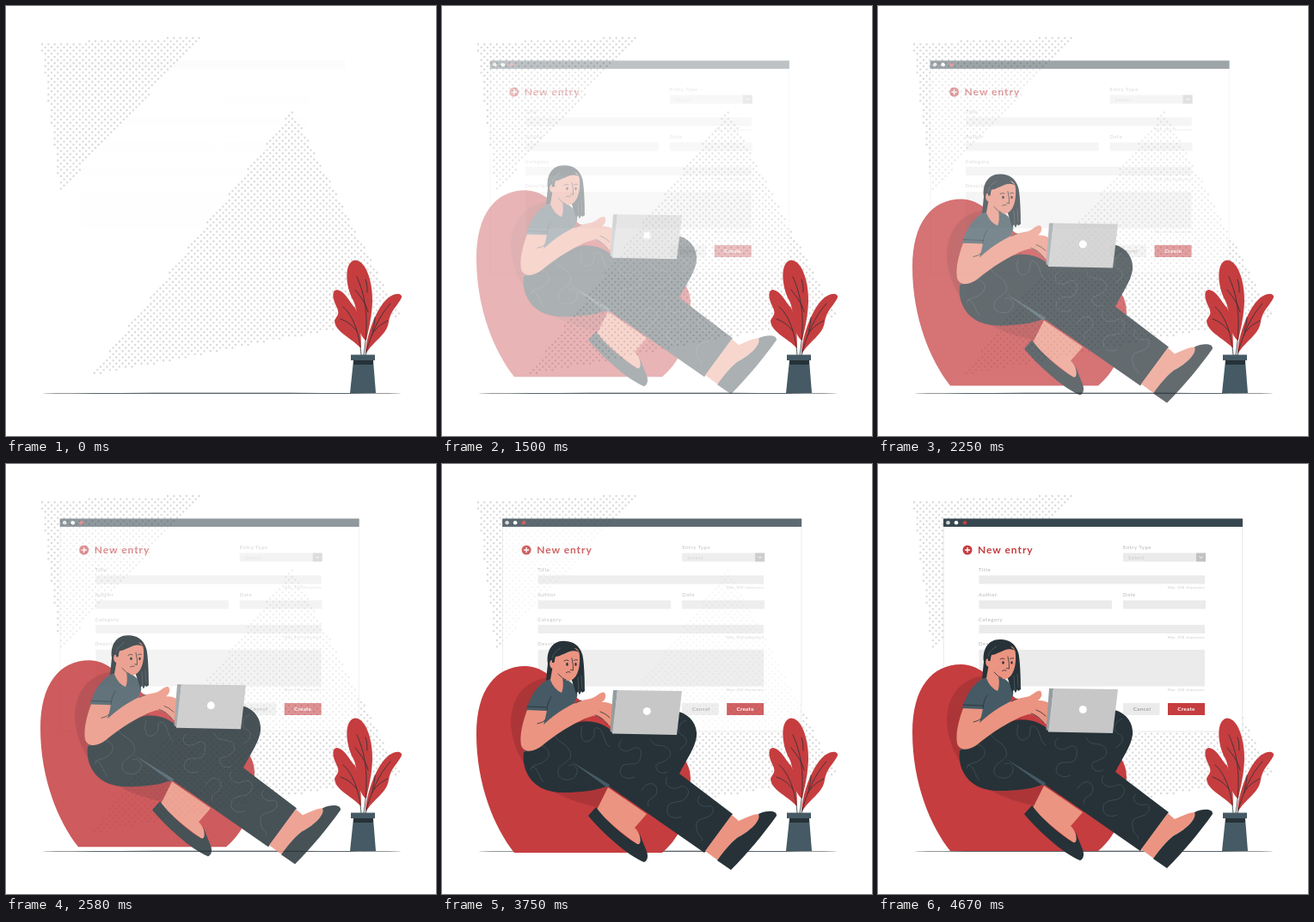
These frames come from a looping animation (500x500 px, 4.71 s). An HTML page:

```html
<!DOCTYPE html>
<html lang="en">
<head>
<meta charset="utf-8">
<title>New entry</title>
<style>
  html, body { margin: 0; height: 100%; overflow: hidden; background: #fff; }
  svg { display: block; width: 100vw; height: 100vh; }
  text { font-family: Lato, sans-serif; fill: #b3b3b3; font-size: 6px; letter-spacing: .5px; }
  .hint { font-size: 4.2px; letter-spacing: .3px; fill: #c4c4c4; text-anchor: end; }
  .button { font-size: 6.4px; font-weight: 700; letter-spacing: .25px; text-anchor: middle; }
  .red { fill: #c53d3f; }
  .dark { fill: #263238; }
  .slate { fill: #455a64; }
  .skin { fill: #eb9481; }
  .field { fill: #ebebeb; }
  .line { fill: none; stroke: #263238; stroke-width: .8; stroke-linecap: round; }
  #dots { fill: none; stroke: #d9d9d9; stroke-width: 2.4; stroke-linecap: round; }
</style>
</head>
<body>
<svg viewBox="0 0 500 500">
  <path id="dots"/>
  <ellipse class="dark" cx="251" cy="450.3" rx="209" ry=".5"/>

  <g id="form">
    <path d="M76.3 64H423.7V311H76.3Z" fill="#fff" stroke="#e0e0e0" stroke-width=".7"/>
    <path d="M76 63.5H424V73H76Z" fill="#37474f"/>
    <circle cx="81.5" cy="68.2" r="2.3" fill="#d5d5d5"/>
    <circle cx="91" cy="68.2" r="2.3" fill="#fff"/>
    <circle cx="101" cy="68.2" r="2.3" class="red"/>
    <circle cx="104" cy="100" r="5.5" class="red"/>
    <path d="M101 100h6M104 97v6" stroke="#fff" stroke-width="1.3"/>
    <text x="116" y="104.3" style="font-size:12px;font-weight:700;letter-spacing:.95px;fill:#c53d3f">New entry</text>
    <path class="field" d="M285 103.5h96v10h-96zM117.5 129.5H380v10H117.5zM117.5 158.5H272v10H117.5zM285 158.5h96v10h-96zM117.5 187H380v10H117.5zM117.5 216H380v42.5H117.5zM285 278h42.5v14H285z"/>
    <path d="M370 103.5h11v10h-11z" fill="#c2c2c2"/>
    <path d="M373.8 107.5l1.7 2 1.7-2" fill="none" stroke="#fff" stroke-width=".9"/>
    <path class="red" d="M337 278h43v14h-43z"/>
    <text x="285" y="99">Entry Type</text>
    <text x="291" y="110.7" style="fill:#c9c9c9">Select</text>
    <text x="117" y="125">Title</text>
    <text x="117" y="154">Author</text>
    <text x="285" y="154">Date</text>
    <text x="117" y="183">Category</text>
    <text x="117" y="211">Description</text>
    <text class="hint" x="380" y="145.3">Max. 250 characters</text>
    <text class="hint" x="380" y="203">Max. 250 characters</text>
    <text class="hint" x="380" y="264.3">Max. 250 characters</text>
    <text class="button" x="307" y="287.3" style="fill:#a3a3a3">Cancel</text>
    <text class="button" x="358.5" y="287.3" style="fill:#fff">Create</text>
  </g>

  <g id="plant">
    <path class="red" d="M417 388C405 374 411 357 404 343C394 325 393 297 406 295.5C420 296 427 325 426 345C425 365 421 378 419 389Z"/>
    <path class="red" d="M413 398C400 385 383 379 382 366C385 359 389 359 384 349C379 339 379 330 385 330C394 331 399 344 406 351C412 362 413 385 413 398Z"/>
    <path class="red" d="M418 405C418 385 432 345 448 337C455 333 461 335 460 339C456 348 447 354 445 367C443 383 428 388 418 405Z"/>
    <path class="line" d="M408 315C417 335 423 360 416 406M418 318C420 323 420 328 420 333M406 330C414 340 419 347 421 356
      M392 350C402 358 411 378 413 406M389 364C398 367 403 372 408 378
      M447 346C434 360 424 382 418 406M429 362C429 367 428 372 426 378M444 366C436 370 430 374 425 383"/>
    <path class="slate" d="M401 405.5h28v6.500h-28zM404 412h23l3 38h-30z"/>
    <path class="dark" d="M404 412h23l-.4 5h-22.4z"/>
  </g>

  <g id="reader">
    <path class="red" d="M84 450C61 421 40 371 40 312C40 261 62 233 97 233C135 233 150 290 265 325C283 338 289 350 289 364C287 402 281 429 256 450Z"/>
    <path d="M124 246C95 250 80 270 80 300C84 350 120 390 195 399L220 380L150 270Z" fill="#ac3538"/>

    <path class="dark" d="M143 204C128 203 121 216 123 230L121 250L134 246H150L156 266L158 262L160 266L162 262L163 264L166 262C166 245 165 225 163 219C160 209 152 204 143 204Z"/>
    <path class="slate" d="M127 248C114 251 104 264 98 284L121 286L95 334L130 325L157 269C159 262 153 250 140 247Z"/>
    <path class="dark" d="M150 244L156 266L158 262L160 266L164 244Z"/>
    <path class="skin" d="M129 232L126 249Q130 260 139 264Q142 258 140 246Z"/>
    <path class="skin" d="M131 222C131 212 137 211 148 212C157 211 160 214 160 222C161 237 156 249 148 250C141 250 133 243 131 236C126 237 124 231 126 227C128 225 131 227 131 230Z"/>
    <path class="dark" d="M128 229C127 214 138 206 148 207L161 218C151 210 140 222 132 222L130 229Z"/>
    <path d="M138 212C132 216 129 219 128 224M158 246l1 17M162 244l1 16" fill="none" stroke="#66757c" stroke-width=".5"/>
    <ellipse class="dark" cx="145.5" cy="231" rx="1.3" ry="1.8"/>
    <ellipse class="dark" cx="155.5" cy="231" rx="1.2" ry="1.8"/>
    <path class="line" d="M142 227q2.500-2 5-.5M153.500 226.500q2-1.500 4-.5M151 224q2 8 1.500 14l-3-.5M144.500 240.500q2-1.500 4.500-.5M135 242q5 6 9 7"/>

    <path class="dark" d="M95 333C110 330 135 305 160 298C176 295 190 301 200 310H272L275 286C290 290 297 302 296 315C294 329 284 342 276 358L338 405L305 450L193 372C180 378 160 380 140 380C108 380 92 358 95 333Z"/>
    <path class="slate" d="M149 343L193 375L195 371L182 363Z"/>
    <path d="M109 326c12-2 20 8 12 16s-16 4-18 12M129 309c3 14 16 12 20 24s-12 12-14 22 14 14 20 6-2-16-8-12
      M163 303c-4 14 2 22 10 16s0-16 8-14 6 18 14 22M210 318c-10 8 0 18 10 12s14 2 10 12-18 0-22 10 8 14 16 10
      M242 318c6 12 16 4 22 12s-4 14-12 16 0 16 10 10M284 296c-10 4-12 14-4 18s4 12-4 16
      M232 378c6-12 18-10 18 0s-14 8-10 18M262 362c-6 10 6 16 14 12s14 4 8 12-20 2-22 12 8 14 16 10
      M300 384c-8 8 4 14 10 12s8 8 0 12-16 2-14 14 8 8 6 14M104 350c8 0 8 12 14 18" fill="none" stroke="#45565e" stroke-width=".7"/>

    <path class="skin" d="M99 284L122 284C121 291 119 297 118 301C133 287 150 277 162 273L172 271C180 270 184 262 189 264C192 268 189 273 186 275C194 275 199 277 200 280L196 303C188 298 185 290 175 291C160 295 135 310 117 325C106 334 95 334 92 325C90 312 94 298 99 284Z"/>
    <path class="line" d="M111 300q6-1 9-4M178 290q8 2 15 11M184 286q6 2 11 7M155 276l7-3"/>
    <path class="slate" d="M112 260C104 268 101 276 98 284L122 285L128 268Z"/>
    <path class="line" d="M99 280l23 1M122 284q1-10 5-15"/>

    <path d="M199 261h5l-5 50.5-3.500-3z" fill="#969ca0"/>
    <path d="M204 261L279 262L273 313L198 311.5Z" fill="#c7c7c7"/>
    <circle cx="238.3" cy="285.5" r="4.5" fill="#fff"/>

    <path class="skin" d="M193 374L238 405L224 421C229 425 233 436 230 442C215 432 190 412 180 400Z"/>
    <path class="dark" d="M179 397L170 407C185 425 215 453 235 461C240 459 240 452 237 446L229 426C232 436 231 441 227 440C210 430 190 412 179 397Z"/>
    <path class="skin" d="M337 406L345 413C352 410 361 405 369 405C372 413 355 427 344 432C334 440 328 448 321 459L306 448Z"/>
    <path class="dark" d="M320 459L336 470C355 451 375 427 389 407C390 401 378 400 368 405C372 413 355 427 344 432C334 440 328 448 320 459Z"/>
  </g>
</svg>
<script>
const LOOP = 4710, LEAD = 40, PITCH = 3.65;
const byId = id => document.getElementById(id);
const form = byId('form'), reader = byId('reader');

// Staggered dot grid clipped to a triangle, anchored at its first corner
function dotTriangle(a, b, c) {
  const side = (p, q, x, y) => {
    const dx = q[0] - p[0], dy = q[1] - p[1];
    return (dx * (y - p[1]) - dy * (x - p[0])) / Math.hypot(dx, dy) > -1.5;
  };
  let d = '';
  for (let row = -100; row <= 100; row++) {
    for (let col = -100; col <= 100; col++) {
      const x = a[0] + col * PITCH, y = a[1] + row * PITCH;
      if ((row + col) % 2 === 0 && side(a, b, x, y) && side(b, c, x, y) && side(c, a, x, y)) {
        d += `M${x.toFixed(2)} ${y.toFixed(2)}h0`;
      }
    }
  }
  return d;
}
byId('dots').setAttribute('d',
  dotTriangle([42, 44.5], [224.5, 37.2], [63.9, 212.4]) +
  dotTriangle([332.7, 123.8], [457, 360], [102.7, 427.5]));

// cubic-bezier(.36, -.01, .5, 1.38): settles with a small overshoot
function settle(x) {
  const curve = (s, p, q) => 3 * (1 - s) ** 2 * s * p + 3 * (1 - s) * s * s * q + s ** 3;
  let lo = 0, hi = 1;
  for (let i = 0; i < 24; i++) {
    const mid = (lo + hi) / 2;
    if (curve(mid, .36, .5) < x) lo = mid; else hi = mid;
  }
  return curve(hi, -.01, 1.38);
}

function pose(el, progress, dx, dy) {
  const rest = 1 - progress;
  el.setAttribute('transform', `translate(${dx * rest} ${dy * rest})`);
  el.setAttribute('opacity', Math.max(0, Math.min(1, progress)));
}

function draw() {
  const p = Math.min(1, (performance.now() % LOOP + LEAD) / LOOP);
  pose(form, p, -30, 0);
  pose(reader, settle(p), 0, -30);
  requestAnimationFrame(draw);
}
draw();
</script>
</body>
</html>
```
